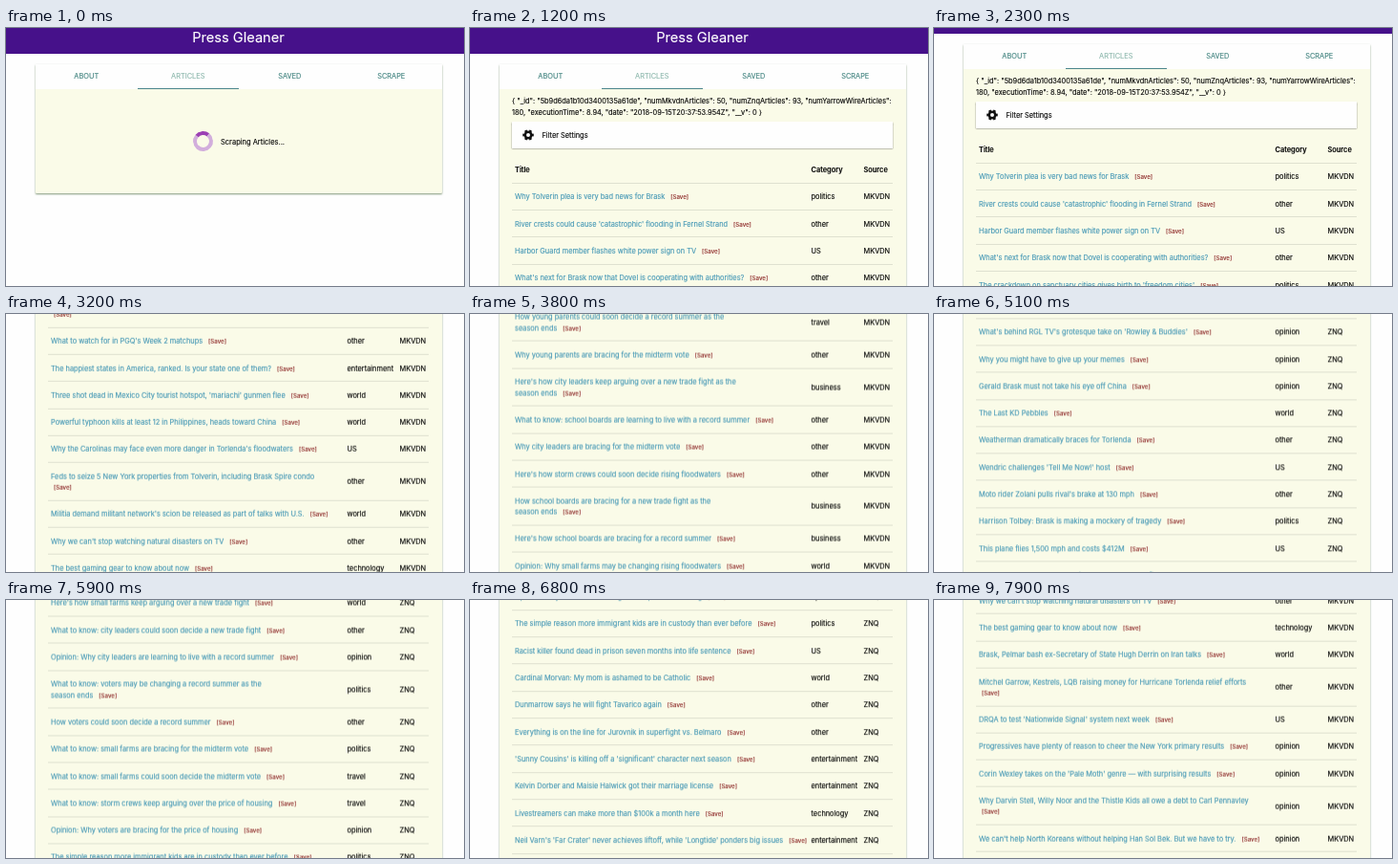
Recreate the animation shown at these times as an HTML page. Size 480 by 270 pixels, loop 8000 ms.

```html
<!DOCTYPE html>
<html lang="en">
<head>
<meta charset="utf-8">
<title>Press Gleaner</title>
<style>
  html, body { margin: 0; width: 100%; height: 100%; overflow: hidden; background: #fefefe; }
  body { font: 7.4px/11.3px Inter, "Open Sans", sans-serif; color: #080808; -webkit-text-stroke: .14px; }
  #stage { position: relative; width: 480px; height: 270px; overflow: hidden; }
  #page, #page > *, #list > *, #card > * { position: absolute; }
  #page { left: 0; top: 0; width: 480px; will-change: transform; }
  header {
    left: 0; top: 0; width: 480px; height: 26.6px; background: #46118a;
    color: #fff; font-size: 14.6px; line-height: 20px; text-align: center; text-indent: 7px;
  }
  #card {
    left: 31px; top: 38px; width: 426px; height: 135px; border-radius: 1px;
    background: #fafbe8; box-shadow: 0 1px 2px #4a6a40b0;
  }
  #tabs { left: 0; top: 0; width: 100%; height: 26px; display: flex; background: #fefefe; }
  #tabs span { flex: 1; line-height: 26px; text-align: center; color: #448581; }
  #tabs .on { color: #8fb9ae; box-shadow: inset 0 -1px #4b858b; }
  #spin {
    left: 165px; top: 69.5px; width: 13px; height: 13px; border-radius: 50%;
    border: 4.5px solid #d2aedc; border-top-color: #9c40b4;
  }
  #wait { left: 194px; top: 75.5px; font-size: 7.5px; white-space: nowrap; }
  #list { left: 44px; top: 0; width: 399px; }
  #info { top: 71px; line-height: 11.8px; white-space: nowrap; }
  #filter {
    top: 98px; width: 399px; height: 28.4px; background: #fefefe;
    box-shadow: 0 .5px 1.5px #0009; line-height: 29px; text-indent: 31.5px;
  }
  #filter svg { position: absolute; left: 9.5px; top: 7px; }
  .row {
    left: 0; width: 399px; box-sizing: border-box; padding: 8.5px 0 0 3px;
    border-bottom: 1px solid #dfe1d0; white-space: nowrap;
  }
  .row i { position: absolute; font-style: normal; }
  .row .cat { left: 313.5px; }
  .row .src { left: 368.5px; }
  .head { top: 134.2px; height: 28.7px; font-weight: 600; }
  .row a { color: #4799b6; }
  .row small { font-size: 6.2px; color: #8c2626; margin-left: 6px; }
  .row .wrapped { margin-left: 3px; }
</style>
</head>
<body>
<div id="stage">
  <div id="page">
    <header>Press Gleaner</header>
    <div id="card">
      <div id="tabs"><span>ABOUT</span><span class="on">ARTICLES</span><span>SAVED</span><span>SCRAPE</span></div>
      <div id="spin"></div>
      <div id="wait">Scraping Articles...</div>
    </div>
    <div id="list">
      <div id="info">{ "_id": "5b9d6da1b10d3400135a61de", "numMkvdnArticles": 50, "numZnqArticles": 93, "numYarrowWireArticles":<br>180, "executionTime": 8.94, "date": "2018-09-15T20:37:53.954Z", "__v": 0 }</div>
      <div id="filter">
        <svg width="14" height="14" viewBox="-7 -7 14 14" fill="none" stroke="#111">
          <circle r="3.3" stroke-width="2.6"/>
          <circle r="4.9" stroke-width="1.8" pathLength="12" stroke-dasharray="1 1" stroke-dashoffset=".5"/>
        </svg>Filter Settings
      </div>
      <div class="row head">Title<i class="cat">Category</i><i class="src">Source</i></div>
    </div>
  </div>
</div>
<script>
const $ = id => document.getElementById(id);
const LINE = 11.3, PAD = 17, FIRST = 162.9;

// Headline ~ category; "|" breaks the line. A number asks for that many generated rows.
const first = `Why Tolverin plea is very bad news for Brask~politics
River crests could cause 'catastrophic' flooding in Fernel Strand~other
Harbor Guard member flashes white power sign on TV~US
What's next for Brask now that Dovel is cooperating with authorities?~other
The crackdown on sanctuary cities gives birth to 'freedom cities'~politics
8
Small towns along the coast count the cost of a week of wind and heavy rain|~US
What to watch for in PGQ's Week 2 matchups~other
The happiest states in America, ranked. Is your state one of them?~entertainment
Three shot dead in Mexico City tourist hotspot, 'mariachi' gunmen flee~world
Powerful typhoon kills at least 12 in Philippines, heads toward China~world
Why the Carolinas may face even more danger in Torlenda's floodwaters~US
Feds to seize 5 New York properties from Tolverin, including Brask Spire condo|~other
Militia demand militant network's scion be released as part of talks with U.S.~world
Why we can't stop watching natural disasters on TV~other
The best gaming gear to know about now~technology
Brask, Pelmar bash ex-Secretary of State Hugh Derrin on Iran talks~world
Mitchel Garrow, Kestrels, LQB raising money for Hurricane Torlenda relief efforts|~other
DRQA to test 'Nationwide Signal' system next week~US
Progressives have plenty of reason to cheer the New York primary results~opinion
Corin Wexley takes on the 'Pale Moth' genre — with surprising results~opinion
Why Darvin Stell, Willy Noor and the Thistle Kids all owe a debt to Carl Pennavley|~opinion
We can't help North Koreans without helping Han Sol Bek. But we have to try.~opinion
20`;
const second = `8
You might get a text next week from Brask~politics
What happened to Milton Harvess? This journalist set out to find the answer~business
Here's how Piet Tolverin might be helpful to the Russia investigation~politics
Tolverin agrees to cooperate with Haldern~politics
Federal prosecutors weigh charges against Provincial powerbroker in Tolverin-|linked probe~politics
Opinion: Despite guilty plea, Piet Tolverin still holds the Brask card~opinion
Len Vosk on Tolverin plea and cooperation deal~other
Longest nonstop flight in the US announced~travel
China's most famous actress vanishes without a trace~world
8
What's behind RGL TV's grotesque take on 'Rowley & Buddies'~opinion
Why you might have to give up your memes~opinion
Gerald Brask must not take his eye off China~opinion
The Last KD Pebbles~world
Weatherman dramatically braces for Torlenda~other
Wendric challenges 'Tell Me Now!' host~US
Moto rider Zolani pulls rival's brake at 130 mph~other
Harrison Tolbey: Brask is making a mockery of tragedy~politics
This plane flies 1,500 mph and costs $412M~US
14
The simple reason more immigrant kids are in custody than ever before~politics
Racist killer found dead in prison seven months into life sentence~US
Cardinal Morvan: My mom is ashamed to be Catholic~world
Dunmarrow says he will fight Tavarico again~other
Everything is on the line for Jurovnik in superfight vs. Belmaro~other
'Sunny Cousins' is killing off a 'significant' character next season~entertainment
Kelvin Dorber and Maisie Halwick got their marriage license~entertainment
Livestreamers can make more than $100k a month here~technology
Neil Varn's 'Far Crater' never achieves liftoff, while 'Longtide' ponders big issues~entertainment
9`;

let seed = 7;
const rand = () => (seed = seed * 16807 % 2147483647) / 2147483647;
const pick = text => { const a = text.split(","); return a[Math.floor(rand() * a.length)]; };

function invent() {
  const title = [
    pick("Why,How,Opinion: Why,Here's how,What to know:"),
    pick("voters,city leaders,young parents,storm crews,small farms,island residents,school boards"),
    pick("are bracing for,may be changing,keep arguing over,could soon decide,are learning to live with"),
    pick("the midterm vote,rising floodwaters,a new trade fight,the price of housing,a record summer")
  ].join(" ");
  const tail = rand() < .15 ? " as the|season ends" : "";
  return title + tail + "~" + pick("politics,other,US,world,opinion,travel,business");
}

const tops = {};
let bottom = FIRST;

function addRow(entry, source) {
  const [title, cat] = entry.split("~");
  const lines = title.replace("&", "&amp;").split("|");
  const height = LINE * lines.length + PAD;
  const row = document.createElement("div");
  row.className = "row";
  row.style.cssText = `top:${bottom}px;height:${height}px`;
  const side = `style="top:${(height - LINE) / 2}px"`;
  const save = title.endsWith("|") ? "wrapped" : "";
  row.innerHTML = `<a>${lines.join("<br>")}</a><small class="${save}">[Save]</small>` +
    `<i class="cat" ${side}>${cat}</i><i class="src" ${side}>${source}</i>`;
  $("list").append(row);
  tops[title] = bottom;
  bottom += height;
}

function addRows(text, source) {
  for (const line of text.split("\n")) {
    if (line.includes("~")) addRow(line, source);
    else for (let n = +line; n > 0; n--) addRow(invent(), source);
  }
}
addRows(first, "MKVDN");
addRows(second, "ZNQ");

// Scroll offset that puts the middle of a headline's row at y.
function at(start, y) {
  const title = Object.keys(tops).find(t => t.startsWith(start));
  return tops[title] + (LINE + PAD) / 2 - y;
}

const keys = [
  [0, 0], [1900, 0], [2300, 21],
  [3200, at("What to watch for", 28.6)],
  [4400, at("You might get", 19.8)],
  [5100, at("What's behind RGL", 19.2)],
  [6800, at("The simple reason", 25.2)],
  [7900, at("The best gaming", 29.2)],
  [8000, at("The best gaming", 32)]
];
const slopes = keys.slice(1).map(([t, y], i) => (y - keys[i][1]) / (t - keys[i][0]));
const tangents = keys.map((_, i) => {
  const a = slopes[i - 1] || 0, b = slopes[i] || 0;
  return a * b > 0 ? 2 * a * b / (a + b) : 0;
});

// Monotone cubic through the keys.
function scrollAt(t) {
  let i = 0;
  while (i < keys.length - 2 && t >= keys[i + 1][0]) i++;
  const [t0, y0] = keys[i], [t1, y1] = keys[i + 1];
  const d = t1 - t0, u = (t - t0) / d, v = 1 - u;
  return y0 * (1 + 2 * u) * v * v + tangents[i] * d * u * v * v +
    y1 * u * u * (3 - 2 * u) - tangents[i + 1] * d * u * u * v;
}

const LOADED = 1000;
function draw(now) {
  const t = Math.floor(now % 8000 / 100) * 100;
  const loaded = t >= LOADED;
  $("list").style.display = loaded ? "" : "none";
  $("spin").style.display = $("wait").style.display = loaded ? "none" : "";
  $("card").style.height = loaded ? bottom - 24 + "px" : "";
  $("spin").style.transform = `rotate(${t * .18 - 6}deg)`;
  $("page").style.transform = `translateY(${-scrollAt(t)}px)`;
}

const start = performance.now();
function tick() {
  draw(performance.now() - start);
  requestAnimationFrame(tick);
}
tick();
</script>
</body>
</html>
```
